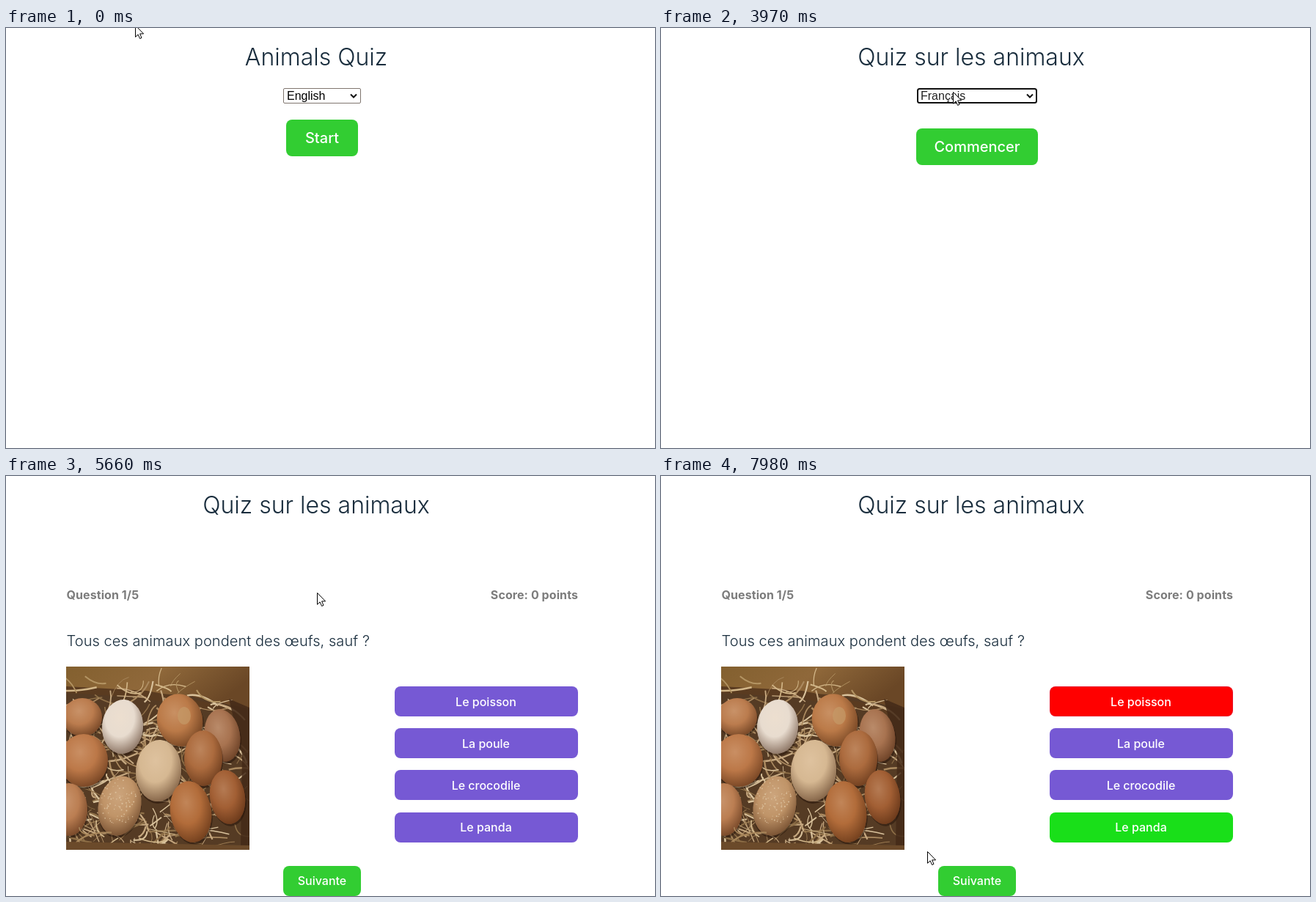
Write an HTML page that moves like this. It is 885 px wide and 573 px high and loops after 8 s.

```html
<!DOCTYPE html>
<html lang="fr">
<head>
<meta charset="utf-8">
<title>Quiz</title>
<style>
  html, body { margin: 0; width: 100%; height: 100%; overflow: hidden; background: #fff; }
  svg { display: block; }
  text { font-family: Inter, sans-serif; font-optical-sizing: none; white-space: pre; }
  .title { font-size: 32px; font-weight: 340; fill: #182c3c; text-anchor: middle; }
  .big { font-size: 20px; font-weight: 500; fill: #fff; text-anchor: middle; }
  .label { font-size: 16px; font-weight: 500; fill: #fff; text-anchor: middle; }
  .info { font-size: 16px; font-weight: 700; fill: #7c7c7c; letter-spacing: .08px; }
  .ask { font-size: 20px; font-weight: 340; fill: #182c3c; letter-spacing: .06px; }
  .field { font: 16px "Liberation Sans", Arial, sans-serif; }
  .go { fill: #32cd32; }
  #popup { filter: drop-shadow(0 2px 4px rgba(0, 0, 0, .35)); }
</style>
</head>
<body>
<svg id="stage" width="885" height="573" viewBox="0 0 885 573">
  <defs>
    <radialGradient id="shade" cx=".42" cy=".34" r=".7">
      <stop offset="0" stop-color="#ffe9d0" stop-opacity=".2"/>
      <stop offset=".5" stop-color="#ffe9d0" stop-opacity="0"/>
      <stop offset=".5" stop-color="#3a1804" stop-opacity="0"/>
      <stop offset="1" stop-color="#3a1804" stop-opacity=".55"/>
    </radialGradient>
    <linearGradient id="wood" x2="1" y2=".3">
      <stop offset="0" stop-color="#83602f"/>
      <stop offset=".5" stop-color="#8f683a"/>
      <stop offset="1" stop-color="#6a4726"/>
    </linearGradient>
  </defs>

  <text id="title" class="title" x="423" y="51.3"></text>

  <g id="startEn">
    <rect id="fieldEn" x="378.5" y="82.5" width="105" height="20" rx="1.5" fill="#fff"/>
    <text id="valueEn" class="field" x="383" y="98"></text>
    <path d="M470 90.5l4 4 4-4" fill="none" stroke="#111" stroke-width="2"/>
    <rect class="go" x="382" y="125" width="98" height="50" rx="8"/>
    <text class="big" x="431" y="157.2">Start</text>
    <g id="popup">
      <rect x="378.5" y="103.5" width="105" height="42" fill="#fff" stroke="#767676"/>
      <rect id="pick" x="379" width="104" height="20" fill="#1967d2"/>
      <text id="optEn" class="field" x="383" y="118">English</text>
      <text id="optFr" class="field" x="383" y="138">French</text>
    </g>
  </g>

  <g id="startFr">
    <rect x="350" y="83" width="162" height="19" rx="2.5" fill="#fff" stroke="#101010" stroke-width="2"/>
    <text class="field" x="354" y="98" fill="#222">Français</text>
    <path d="M499 90.5l4 4 4-4" fill="none" stroke="#111" stroke-width="2"/>
    <rect class="go" x="348" y="137" width="166" height="50" rx="8"/>
    <text class="big" x="431" y="169.2">Commencer</text>
  </g>

  <g id="quiz">
    <text class="info" x="82.5" y="168">Question 1/5</text>
    <text class="info" x="780" y="168" text-anchor="end">Score: 0 points</text>
    <text class="ask" x="82.5" y="232">Tous ces animaux pondent des œufs, sauf ?</text>
    <svg id="photo" x="82" y="260" width="250" height="250"></svg>
    <g id="answers"></g>
    <rect class="go" x="378" y="532" width="106" height="41" rx="8"/>
    <text class="label" x="431" y="558">Suivante</text>
  </g>

  <path id="arrow" fill="#fff" stroke="#000" d="M.5.5V16.3L4.1 12.9 6.6 18.5 9 17.4 6.6 11.9H11.6Z"/>
  <path id="hand" fill="#fff" stroke="#000" d="M4.5 13V2a1.5 1.5 0 0 1 3 0V8.5a1.5 1.5 0 0 1 3 0V9.5a1.5 1.5 0 0 1 3 0V10.5a1.4 1.4 0 0 1 2.5 .5V15c0 2-1.5 4-1.5 6.5H6.5C6.5 19 2 15.5.7 12.6 0 11 2 10 3.2 11.4Z"/>
</svg>

<script>
const LOOP = 8000;
const OPEN = 1710, CHOOSE = 2630, FRENCH = 3310, BEGIN = 4660, QUIZ = 4800, PHOTO = 4870;
const HOVER = 6400, ANSWER = 6950, LEAVE = 7770, FADE = 250;

const $ = id => document.getElementById(id);
const show = (id, on) => { $(id).style.display = on ? '' : 'none'; };
const clamp = v => Math.max(0, Math.min(1, v));

function add(parent, tag, attrs, text) {
  const el = document.createElementNS('http://www.w3.org/2000/svg', tag);
  for (const key in attrs) el.setAttribute(key, attrs[key]);
  if (text) el.textContent = text;
  parent.appendChild(el);
  return el;
}

// Answer buttons
const boxes = ['Le poisson', 'La poule', 'Le crocodile', 'Le panda'].map((name, i) => {
  const y = Math.round(287 + i * 57.2);
  const box = add($('answers'), 'rect', { x: 530, y, width: 250, height: 41, rx: 8 });
  add($('answers'), 'text', { class: 'label', x: 654.5, y: 314 + i * 57 }, name);
  return box;
});
const ring = add($('answers'), 'rect',
  { x: 530.5, y: 287.5, width: 249, height: 40, rx: 7.5, fill: 'none', stroke: '#646cff' });

// Eggs in a straw-filled crate
let seed = 11;
const rand = (a, b) => {
  seed = (seed * 16807) % 2147483647;
  return a + (b - a) * seed / 2147483647;
};

function straw(count, top, bottom, tones) {
  for (let i = 0; i < count; i++) {
    const x = rand(-20, 235), y = rand(top, bottom), a = rand(0, 6.28), len = rand(18, 55);
    const dx = Math.cos(a) * len, dy = Math.sin(a) * len * .8;
    const bx = dx / 2 + rand(-12, 12), by = dy / 2 + rand(-12, 12);
    add($('photo'), 'path', {
      d: `M${x} ${y}q${bx} ${by} ${dx} ${dy}`, fill: 'none',
      stroke: tones[i % tones.length], 'stroke-width': rand(.8, 2.6)
    });
  }
}

function drawPhoto() {
  const p = $('photo');
  add(p, 'rect', { width: 250, height: 250, fill: '#553b24' });
  add(p, 'path', { d: 'M0 0H250V58L170 40 0 28Z', fill: 'url(#wood)' });
  add(p, 'path', { d: 'M0 27L110 33 250 60V70L100 42 0 36Z', fill: '#5a3b20' });
  straw(330, 42, 240, ['#c6a880', '#8f7048', '#d9c29c', '#ab8a60']);
  straw(14, 18, 40, ['#d2b688', '#b39463']);
  add(p, 'path', { d: 'M222 44L250 56V250H238L240 120Z', fill: '#432a18', opacity: .85 });
  const eggs = [
    [22, 69, 27, 26, 0, '#bb7c4e'],
    [77, 82, 28, 37, 4, '#e8dccf'],
    [155, 73, 31, 36, -12, '#bb7a48'],
    [213, 94, 24, 36, -10, '#a87350'],
    [24, 128, 33, 36, 0, '#bc7848'],
    [187, 125, 26, 38, 0, '#ac6b3e'],
    [126, 142, 31, 42, 4, '#d6b892'],
    [4, 195, 25, 36, 0, '#bb7e52'],
    [73, 190, 29, 41, 12, '#c09468'],
    [220, 178, 24, 37, -8, '#a25f34'],
    [170, 198, 28, 42, -8, '#b26c3a']
  ];
  for (const [cx, cy, rx, ry, turn, fill] of eggs) {
    const place = { cx, cy, rx, ry, transform: `rotate(${turn} ${cx} ${cy})` };
    add(p, 'ellipse', { ...place, cx: cx + 1, cy: cy + 3, fill: '#1e0f06', opacity: .45 });
    add(p, 'ellipse', { ...place, fill });
    add(p, 'ellipse', { ...place, fill: 'url(#shade)' });
  }
  add(p, 'ellipse', { cx: 161, cy: 67, rx: 9, ry: 12, fill: '#c59a68', opacity: .7 });
  for (let i = 0; i < 90; i++) {
    const a = rand(0, 6.28), r = Math.sqrt(rand(0, 1));
    add(p, 'circle', { cx: 72 + Math.cos(a) * r * 25, cy: 186 + Math.sin(a) * r * 33,
      r: rand(.4, 1.1), fill: '#e0c7a4', opacity: .8 });
  }
  straw(10, 226, 242, ['#d3b98d', '#a8865a']);
  add(p, 'path', { d: 'M0 239L250 244V250H0Z', fill: '#6b4a2a' });
}
drawPhoto();

// Pointer moves: start, end, steps, first x, y, last x, y
const moves = [
  [740, 1430, 11, 184, 0, 398, 83],
  [3970, 4730, 11, 398, 87, 408, 148],
  [5660, 6410, 12, 424, 159, 575, 299],
  [7770, 7980, 4, 543, 335, 363, 512]
];

function pointer(t) {
  let pos = [176, -4];
  for (const [t0, t1, n, x0, y0, x1, y1] of moves) {
    if (t < t0) break;
    const k = Math.floor(clamp((t - t0) / (t1 - t0)) * (n - 1) + .02) / (n - 1);
    pos = [Math.round(x0 + (x1 - x0) * k), Math.round(y0 + (y1 - y0) * k)];
  }
  return pos;
}

const inside = ([x, y], l, t, r, b) => x >= l && x < r && y >= t && y < b;

function render(t) {
  const french = t >= FRENCH, chosen = t >= CHOOSE, quiz = t >= QUIZ, answered = t >= ANSWER;
  const pos = pointer(t);

  $('title').textContent = french ? 'Quiz sur les animaux' : 'Animals Quiz';
  show('startEn', !french);
  show('startFr', french && t < BEGIN);
  show('quiz', quiz);
  show('photo', t >= PHOTO);

  show('popup', t >= OPEN);
  $('valueEn').textContent = chosen ? 'French' : 'English';
  $('fieldEn').setAttribute('stroke', inside(pos, 378, 82, 484, 103) ? '#3a3a3a' : '#80766f');
  $('pick').setAttribute('y', chosen ? 124 : 104);
  $('optEn').setAttribute('fill', chosen ? '#000' : '#fff');
  $('optFr').setAttribute('fill', chosen ? '#fff' : '#000');

  boxes.forEach((box, i) => {
    const marked = answered && (i === 0 ? '#f00' : i === 3 && '#19df19');
    box.setAttribute('fill', marked || '#7659d4');
  });
  ring.setAttribute('opacity', clamp((t - HOVER) / FADE) - clamp((t - LEAVE) / FADE));

  const hand = quiz
    ? inside(pos, 530, 287, 780, 328)
    : french && t < BEGIN && inside(pos, 348, 137, 514, 187);
  show('hand', hand);
  show('arrow', !hand);
  const [x, y] = pos;
  $('hand').setAttribute('transform', `translate(${x - 6} ${y})`);
  $('arrow').setAttribute('transform', `translate(${x} ${y})`);
}

const begin = performance.now();
function tick() {
  render((performance.now() - begin) % LOOP);
  requestAnimationFrame(tick);
}
tick();
</script>
</body>
</html>
```
